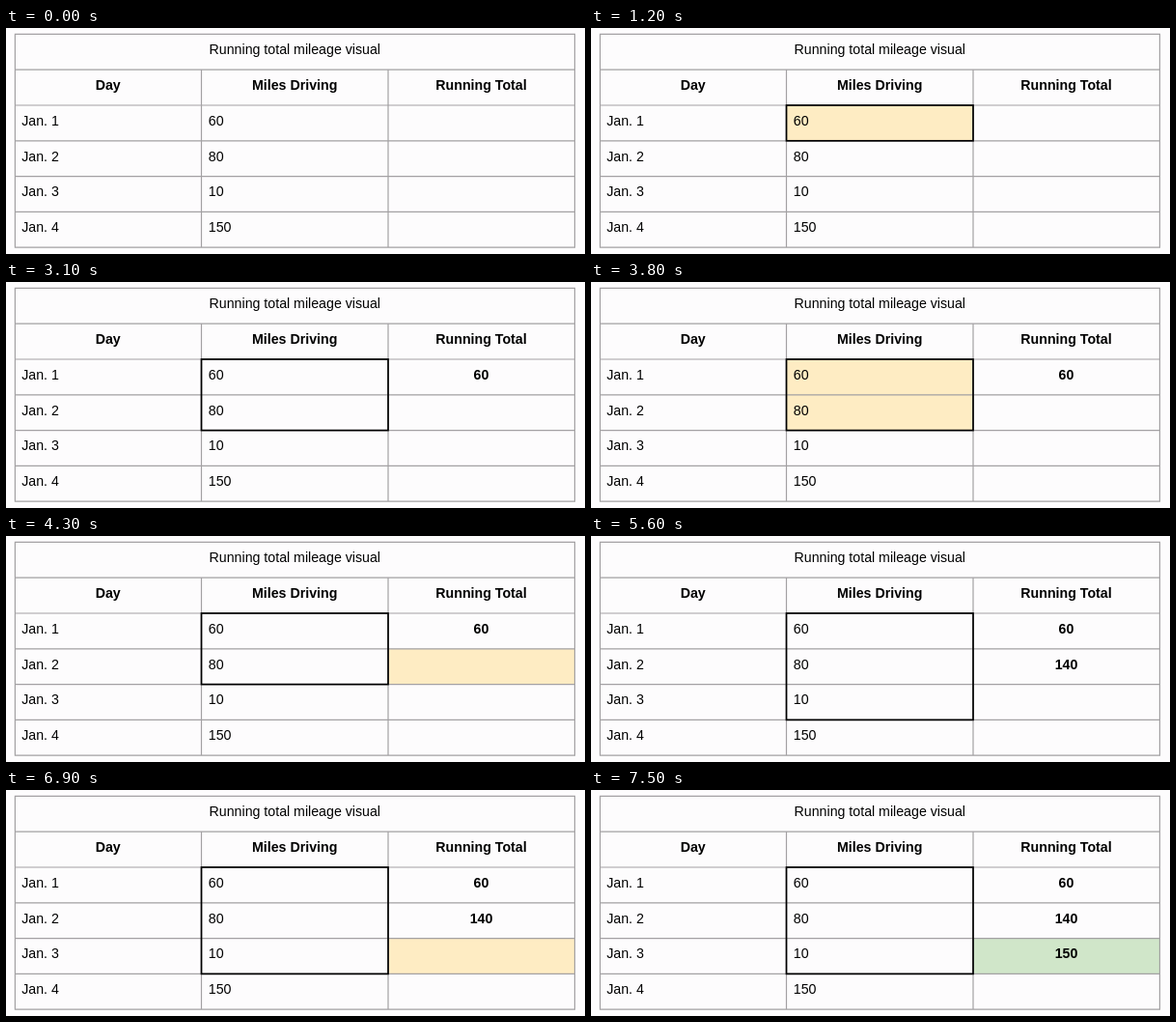
Animation, 600 px wide and 234 px high, one loop 8 s. Source, as an HTML page:

```html
<!DOCTYPE html>
<html lang="en">
<head>
<meta charset="utf-8">
<title>Running total mileage</title>
<style>
html, body { margin: 0; width: 100%; height: 100%; overflow: hidden; background: #fdfcfd; }
svg { display: block; width: 600px; height: 234px; }
text { font: 14.2px "Liberation Sans", Arial, sans-serif; fill: #000; }
.bold { font-weight: bold; }
.mid { text-anchor: middle; }
</style>
</head>
<body>
<svg id="stage" viewBox="0 0 600 234"></svg>
<script>
const LOOP = 8000;
const YELLOW = '#feecc3', GREEN = '#d0e6c9';
const X = [9.4, 202.5, 396, 589.4];
const rowY = i => 6.4 + 36.8 * i;
const baseline = i => rowY(i) + 20.8;
const miles = [60, 80, 10, 150];

// Per day: outline, highlight miles, highlight total, reveal total
const steps = [
  [500, 1200, 1800, 2300],
  [3100, 3700, 4300, 5000],
  [5600, 6200, 6800, 7500]
];

const stage = document.getElementById('stage');
function add(tag, attrs, content) {
  const el = document.createElementNS('http://www.w3.org/2000/svg', tag);
  for (const key in attrs) el.setAttribute(key, attrs[key]);
  if (content !== undefined) el.textContent = content;
  stage.appendChild(el);
  return el;
}
const label = (x, row, str, cls = '') =>
  add('text', { x, y: baseline(row), class: cls }, str);
const show = (el, on) => el.setAttribute('visibility', on ? 'visible' : 'hidden');
const block = (col, row, attrs) => add('rect', {
  x: X[col], y: rowY(row), width: X[col + 1] - X[col], height: 36.8, ...attrs
});

const milesFill = block(1, 2, { fill: YELLOW });
const totalFill = block(2, 2, {});

const grid = [`M${X[0]} ${rowY(0)}H${X[3]}V${rowY(6)}H${X[0]}Z`];
for (let i = 1; i < 6; i++) grid.push(`M${X[0]} ${rowY(i)}H${X[3]}`);
for (const x of [X[1], X[2]]) grid.push(`M${x} ${rowY(1)}V${rowY(6)}`);
add('path', { d: grid.join(''), fill: 'none', stroke: '#a3a1a3', 'stroke-width': 1.2 });

const outline = block(1, 2, { fill: 'none', stroke: '#000', 'stroke-width': 1.7 });

label(299.3, 0, 'Running total mileage visual', 'mid');
label(105.7, 1, 'Day', 'bold mid');
label(299.2, 1, 'Miles Driving', 'bold mid');
label(492.5, 1, 'Running Total', 'bold mid');
miles.forEach((m, i) => {
  label(16.2, i + 2, 'Jan. ' + (i + 1));
  label(209.8, i + 2, m);
});

let sum = 0;
const totals = steps.map((s, i) => label(492.5, i + 2, sum += miles[i], 'bold mid'));

function draw(t) {
  const day = steps.filter(s => t >= s[0]).length - 1;
  const phase = day < 0 ? -1 : steps[day].filter(at => t >= at).length - 1;
  const height = 36.8 * (day + 1);

  show(outline, day >= 0);
  outline.setAttribute('height', height);
  show(milesFill, phase === 1);
  milesFill.setAttribute('height', height);
  show(totalFill, phase >= 2);
  totalFill.setAttribute('y', rowY(day + 2));
  totalFill.setAttribute('fill', phase === 3 ? GREEN : YELLOW);
  totals.forEach((el, i) => show(el, t >= steps[i][3]));
}

const start = performance.now();
function tick() {
  draw((performance.now() - start) % LOOP);
  requestAnimationFrame(tick);
}
tick();
</script>
</body>
</html>
```
